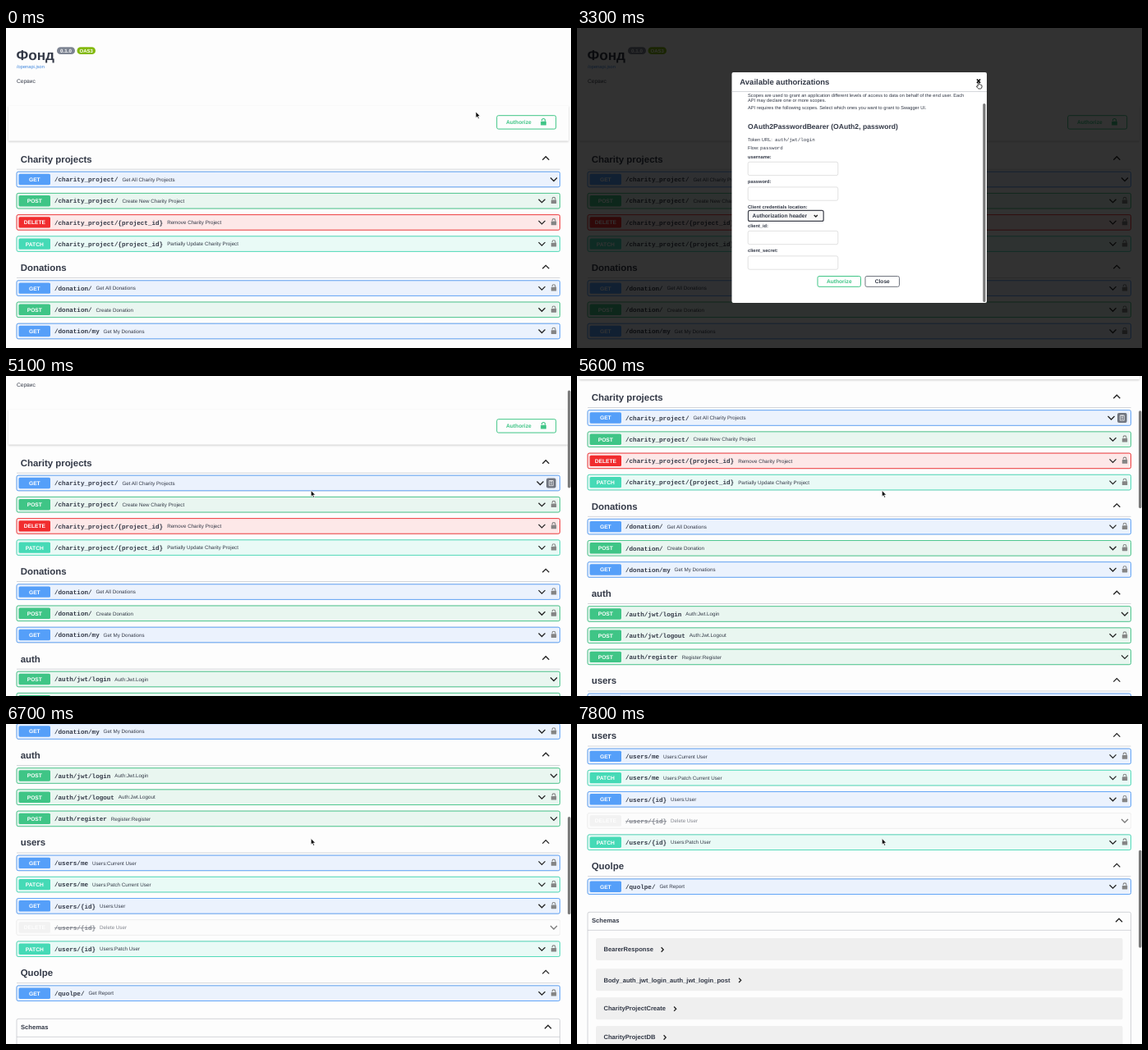
These frames come from a looping animation (688x390 px, 8000 ms). An HTML page:

```html
<!DOCTYPE html>
<html lang="en">
<head>
<meta charset="utf-8">
<title>API docs</title>
<style>
html, body { margin: 0; width: 100%; height: 100%; overflow: hidden; background: #fdfdfd; }
svg { display: block; width: 688px; height: 390px; }
text { font-family: "Liberation Sans", Arial, sans-serif; fill: #333947; text-rendering: geometricPrecision; white-space: pre; }
.b { font-weight: bold; }
.m { font-family: "Liberation Mono", "Courier New", monospace; }
.mid { text-anchor: middle; }
.w { fill: #fff; }
.g { fill: #3fc586; }
.line { fill: none; stroke: #222; stroke-width: 1.3; }
.row { filter: drop-shadow(0 0 .7px #0003); }
.bar { filter: drop-shadow(0 1px 1px #0003); }
</style>
</head>
<body>
<svg viewBox="0 0 688 390">
  <defs><clipPath id="bodyClip"><rect x="188" y="78" width="311" height="256"/></clipPath></defs>
  <g id="page"></g>
  <rect id="thumb" x="684" width="3.4" height="119" rx="1.7" fill="#7c7c7c"/>
  <g id="modal"></g>
  <path id="arrow" d="M0 0V7.6L1.8 6L3 8.8L4.3 8.2L3.1 5.5H5.5Z" fill="#111" stroke="#fff" stroke-width=".7"/>
  <path id="hand" d="M-.8 .2Q0-.8 .8 .2V3Q1.6 2.6 2 3.2Q2.8 2.8 3.1 3.5Q4 3.3 4 4.4V6Q3.8 7.8 2.4 8H-.2Q-1.2 7.4-2.6 5Q-2.2 4.1-.8 5Z" fill="#fff" stroke="#111" stroke-width=".8"/>
</svg>
<script>
const $ = id => document.getElementById(id);

// y is the middle of the capital letters
const text = (x, y, size, str, cls = '') =>
  `<text x="${x}" y="${y}" dy=".36em" font-size="${size}" class="${cls}">${str}</text>`;
const rect = (x, y, w, h, fill, r = 0, more = '') =>
  `<rect x="${x}" y="${y}" width="${w}" height="${h}" rx="${r}" fill="${fill}" ${more}/>`;
const stroke = (color, width = 1) => `stroke="${color}" stroke-width="${width}"`;
const rule = (x, y, w) => rect(x, y - .3, w, .6, '#b9bcc3');
const chevron = (x, y, dir = 1, r = 4) =>
  `<path class="line" d="M${x - r} ${y - dir * r / 2}l${r} ${dir * r}l${r} ${-dir * r}"/>`;
const lock = (x, y, color, k = 1) => `<g transform="translate(${x} ${y}) scale(${k})">
  ${rect(-3.2, -.7, 6.4, 4.7, color, .6)}
  <path d="M1.9-.6V-1.8a1.9 1.9 0 0 0-3.8 0v.4" fill="none" ${stroke(color, 1.1)}/></g>`;

const colors = {
  GET: ['#559ff9', '#ebf2fd'], POST: ['#3fc586', '#e9f6f0'],
  DELETE: ['#f12c2e', '#fde8e8'], PATCH: ['#45dab6', '#e9faf6'], off: ['#ebebeb', '#fcfcfc']
};

// method|path|summary|flag: "-" has no lock, "x" is deprecated
const groups = [
  ['Charity projects',
    'GET|/charity_project/|Get All Charity Projects|-',
    'POST|/charity_project/|Create New Charity Project',
    'DELETE|/charity_project/{project_id}|Remove Charity Project',
    'PATCH|/charity_project/{project_id}|Partially Update Charity Project'],
  ['Donations',
    'GET|/donation/|Get All Donations',
    'POST|/donation/|Create Donation',
    'GET|/donation/my|Get My Donations'],
  ['auth',
    'POST|/auth/jwt/login|Auth:Jwt.Login|-',
    'POST|/auth/jwt/logout|Auth:Jwt.Logout',
    'POST|/auth/register|Register:Register|-'],
  ['users',
    'GET|/users/me|Users:Current User',
    'PATCH|/users/me|Users:Patch Current User',
    'GET|/users/{id}|Users:User',
    'DELETE|/users/{id}|Delete User|x',
    'PATCH|/users/{id}|Users:Patch User'],
  ['Quolpe',
    'GET|/quolpe/|Get Report']
];

function operation(spec, y) {
  const [method, path, summary, flag] = spec.split('|');
  const off = flag === 'x';
  const [color, fill] = colors[off ? 'off' : method];
  const pathEnd = 59 + path.length * 4.56;
  return `<g opacity="${off ? .6 : 1}">
    ${rect(13, y - 9.3, 661.5, 18.6, fill, 2, `class="row" ${stroke(color, .9)}`)}
    ${rect(15.5, y - 6.7, 38.5, 13.4, color, 1.6)}
    ${text(34.8, y, 6.67, method, 'b w mid')}
    ${text(59, y, 7.6, path, 'b m')}
    ${off ? rect(59, y, pathEnd - 59, .7, '#333947') : ''}
    ${text(pathEnd + 4.9, y, 6.25, summary)}
    <g class="down">${chevron(flag ? 667 : 652.5, y)}</g>
    ${flag ? '' : lock(667, y - .6, '#858585')}</g>`;
}

function buildPage() {
  let out = text(12.5, 33, 17.2, 'Фонд', 'b')
    + rect(62, 23.3, 22, 8.8, '#7d8492', 4.4) + text(73, 27.7, 6.2, '0.1.0', 'b w mid')
    + rect(86.5, 23.3, 22.5, 8.8, '#83b90d', 4.4) + text(97.7, 27.7, 6, 'OAS3', 'b w mid')
    + `<g style="fill:#3f86dc">${text(13, 47.3, 5.7, '/openapi.json').replace('<text', '<text style="fill:inherit"')}</g>`
    + text(13, 64.5, 6.67, 'Сервис')
    + rect(3, 95, 682, 42.6, '#fdfdfd', 0, 'class="bar"')
    + rect(597.7, 106.7, 72, 16.4, '#fdfdfd', 2, stroke('#3fc586'))
    + text(609, 115, 6.67, 'Authorize', 'b g') + lock(654.5, 114.4, '#3fc586', 1.05);
  let y = 159.4;
  for (const [name, ...rows] of groups) {
    out += text(17.7, y, 11.43, name, 'b') + chevron(657.3, y - .7, -1) + rule(13, y + 12.7, 661.5);
    y += 25.1;
    for (const row of rows) {
      out += operation(row, y);
      y += 26.2;
    }
    y += 2.7;
  }
  out += rect(13, 719.8, 661.5, 400, 'none', 2, stroke('#bfc2c8', .7))
    + text(18, 729.5, 7.6, 'Schemas', 'b') + chevron(660, 729.7, -1) + rule(13, 741.7, 661.5);
  const models = [['BearerResponse', 765, 104], ['Body_auth_jwt_login_auth_jwt_login_post', 802.3, 198.5],
    ['CharityProjectCreate', 837.2, 119.5], ['CharityProjectDB', 872, 107]];
  for (const [name, my, cx] of models) {
    out += rect(23, my - 13.5, 641.5, 27, '#efefef', 2) + text(32.5, my, 7.6, name, 'b')
      + `<path class="line" d="M${cx - 1.4} ${my - 2.2}l2.6 2.7l-2.6 2.7"/>`;
  }
  return out + `<g id="copy">${rect(658, 178.5, 11.6, 12, '#70757f', 2)}
    <path d="M661.3 181.5h5v6.2h-5zM662.8 181v1.3h2v-1.3M662.6 184h2.4M662.6 185.8h2.4" fill="none" ${stroke('#fff', .7)}/></g>`;
}

function buildModal() {
  const field = (label, y) => text(208, y, 5.7, label, 'b')
    + rect(208.2, y + 6.7, 109.6, 16.3, '#fff', 2, stroke('#d5d5d5', .7));
  const button = (x, w, label, color, cls) => rect(x, 316.3, w, 12.8, '#fff', 2, stroke(color))
    + text(x + w / 2, 322.7, 6.67, label, 'b mid ' + cls);
  return rect(0, 0, 688, 390, '#000', 0, 'opacity=".8"')
    + rect(188.5, 54, 310.5, 281, '#fff', 2)
    + text(198.3, 65.5, 9.52, 'Available authorizations', 'b')
    + '<path d="M486.9 62.5l4.2 4.2m0-4.2l-4.2 4.2" stroke="#000" stroke-width="1.5"/>'
    + rule(188.5, 77.5, 310.5)
    + '<g clip-path="url(#bodyClip)"><g id="form">'
    + text(208, 95.3, 5.7, 'Scopes are used to grant an application different levels of access to data on behalf of the end user. Each')
    + text(208, 101.8, 5.7, 'API may declare one or more scopes.')
    + text(208, 111, 5.7, 'API requires the following scopes. Select which ones you want to grant to Swagger UI.')
    + text(208, 133.5, 8.6, 'OAuth2PasswordBearer (OAuth2, password)', 'b')
    + text(208, 149.5, 5.7, 'Token URL:') + text(241, 149.5, 5.8, 'auth/jwt/login', 'm')
    + text(208, 159.5, 5.7, 'Flow:') + text(223, 159.5, 5.8, 'password', 'm')
    + field('username:', 170.4) + field('password:', 201) + text(208, 231.6, 5.7, 'Client credentials location:', 'b')
    + rect(208.5, 236.2, 91.7, 13, '#f7f7f7', 2, stroke('#41444e', 1.2))
    + text(213.6, 242.8, 6.67, 'Authorization header', 'b') + chevron(290.8, 242.8, 1, 2.1)
    + field('client_id:', 254.5) + field('client_secret:', 285)
    + button(293, 52.5, 'Authorize', '#3fc586', 'g') + button(351, 41.5, 'Close', '#70757f', '')
    + `<g id="focus">${rect(207.9, 176.7, 110.3, 17, 'none', 2.2, stroke('#7ea9ea', 1.8))}</g>`
    + `<g id="caret">${rect(212.8, 181, .7, 8, '#222')}</g></g></g>`
    + `<g id="formThumb">${rect(494.3, 92, 3.2, 242, '#777', 1.6)}</g>`;
}

$('page').innerHTML = buildPage();
$('modal').innerHTML = buildModal();
const firstDown = document.querySelector('.down');

const pointer = [[0, 572, 102], [600, 610, 115], [1100, 610, 115], [1400, 597, 116], [2000, 370, 240],
  [2500, 380, 235], [2900, 486, 84], [3100, 489, 66], [3450, 489, 66], [3800, 371.3, 139.5]];
const scroll = [[4300, 0], [4400, 8], [4500, 24.4], [4600, 37], [4700, 43], [4900, 43], [5100, 54], [5300, 80],
  [5600, 133.5], [5900, 200], [6300, 290], [6700, 360.5], [7000, 415], [7300, 447], [7400, 447], [7600, 474], [7800, 490.5]];
const formScroll = [[2100, 0], [2300, 5], [2600, 13.8]];

// linear between points, held at both ends
function at(keys, t, k = 1) {
  const i = keys.findIndex(p => p[0] > t);
  if (i < 0) return keys[keys.length - 1][k];
  if (i === 0) return keys[0][k];
  const a = keys[i - 1], b = keys[i];
  return a[k] + (b[k] - a[k]) * (t - a[0]) / (b[0] - a[0]);
}
const show = (id, on) => $(id).style.display = on ? '' : 'none';
const move = (el, x, y) => el.setAttribute('transform', `translate(${x} ${y})`);

function draw(now) {
  const t = Math.floor(now % 8000 / 100) * 100; // ten pictures a second
  const s = at(scroll, t), f = at(formScroll, t);
  move($('page'), 0, -s);
  $('thumb').setAttribute('y', .6 + .312 * s);
  show('thumb', t >= 4400);
  show('copy', t >= 5000);
  move(firstDown, t >= 5000 ? -16.5 : 0, 0);

  show('modal', t >= 900 && t < 3500);
  move($('form'), 0, -f);
  move($('formThumb'), 0, f - 13.8);
  show('formThumb', t >= 2200);
  show('focus', t >= 1000 && t < 2200);
  show('caret', t >= 1000 && t < 2200 && (t - 900) % 1000 < 500);

  const onClose = t >= 3000 && t < 3500;
  show('hand', onClose);
  show('arrow', !onClose);
  move($(onClose ? 'hand' : 'arrow'), at(pointer, t, 1), at(pointer, t, 2));
  requestAnimationFrame(loop);
}
const start = performance.now();
const loop = () => draw(performance.now() - start);
loop();
</script>
</body>
</html>
```
